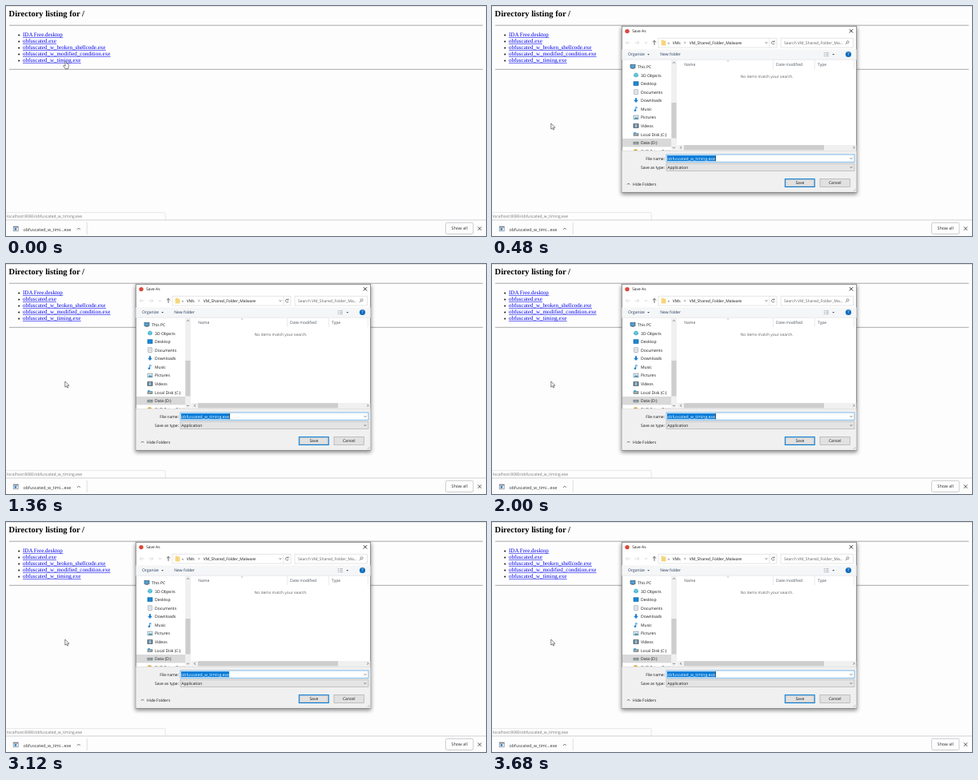
Recreate the animation shown at these times as an HTML page. Size 600 by 288 pixels, loop 8 s.

```html
<!DOCTYPE html>
<html lang="en">
<head>
<meta charset="utf-8">
<title>Save As</title>
<style>
html, body { margin: 0; width: 100%; height: 100%; overflow: hidden; background: #fdfdfe; }
svg { display: block; width: 600px; height: 288px; }
text { font-family: "Open Sans", "Noto Sans", sans-serif; text-rendering: geometricPrecision; white-space: pre; }
.page text { font: 7.03px "Liberation Serif", serif; fill: #0000ee; }
.page .title { font: bold 10.5px "Liberation Serif", serif; fill: #000; }
</style>
</head>
<body>
<svg id="stage" viewBox="0 0 600 288">
  <defs>
    <filter id="shadow" x="-6%" y="-9%" width="112%" height="118%"><feGaussianBlur stdDeviation="2.8"/></filter>
    <clipPath id="treeClip"><rect x="163" y="67" width="61" height="114.3"/></clipPath>
  </defs>
</svg>
<script>
const stage = document.getElementById('stage');

const text = (x, y, s, { fill = '#151515', size = 5, anchor = 'start' } = {}) =>
  `<text x="${x}" y="${y}" fill="${fill}" font-size="${size}" text-anchor="${anchor}">${s}</text>`;
const rect = (x, y, w, h, fill, stroke = 'none', extra = '') =>
  `<rect x="${x}" y="${y}" width="${w}" height="${h}" fill="${fill}" stroke="${stroke}" stroke-width=".7" ${extra}/>`;
const line = (d, color = '#666', width = .7) => `<path d="${d}" fill="none" stroke="${color}" stroke-width="${width}"/>`;
const shape = (d, fill, extra = '') => `<path d="${d}" fill="${fill}" ${extra}/>`;
const dot = (x, y, r, fill) => `<circle cx="${x}" cy="${y}" r="${r}" fill="${fill}"/>`;
const chevron = (x, y, dy, size = 1.6, color = '#444') => line(`M${x - size} ${y - dy}L${x} ${y + dy}L${x + size} ${y - dy}`, color);
const cross = (x, y, r, color) => line(`M${x - r} ${y - r}L${x + r} ${y + r}M${x + r} ${y - r}L${x - r} ${y + r}`, color, .9);
const triangle = (x, y) => shape(`M${x - 1.4} ${y - .7}h2.8l-1.4 1.5z`, '#444');

function page() {
  const files = [
    ['IDA Free.desktop', 50.3], ['obfuscated.exe', 42], ['obfuscated_w_broken_shellcode.exe', 104],
    ['obfuscated_w_modified_condition.exe', 109.6], ['obfuscated_w_timing.exe', 72.7]
  ];
  const rows = files.map(([name, width], i) => {
    const y = 38 + i * 8;
    return dot(16.2, y - 1.6, 1, '#111') + `<text x="21" y="${y}">${name}</text>` + line(`M21 ${y + 1.4}h${width}`, '#0000ee', .6);
  }).join('');
  return `<g class="page">${rect(0, 0, 600, 288, '#fdfdfe')}${line('M0 .4H600', '#d4d4d6')}
    <text class="title" x="3.6" y="13">Directory listing for /</text>
    ${line('M4 24.2H596M4 79.3H596', '#a0a0a0', .9)}${rows}</g>`;
}

function browserBars() {
  return rect(-1, 258.6, 200.2, 10, '#fdfdfe', '#dedee0', 'rx="1"')
    + text(1, 265.2, 'localhost:8080/obfuscated_w_timing.exe', { fill: '#747474' })
    + rect(0, 268, 600, 20, '#fdfdfe') + line('M0 268H600', '#bdbdc0')
    + rect(9.2, 276, 6, 5.8, '#f4f6f8', '#7d8894') + rect(9.2, 276, 6, 1.5, '#7d8894') + rect(10.6, 278.2, 2.6, 2.4, '#2e77b5')
    + text(21.5, 281.6, 'obfuscated_w_timi...exe', { fill: '#333', size: 5.4 })
    + chevron(90.8, 279, -1, 2) + line('M101.2 271V286', '#d0d0d3')
    + rect(549.6, 271.3, 34.4, 14.2, '#fdfdfe', '#b8b8bc', 'rx="1.8"')
    + text(566.8, 280.3, 'Show all', { fill: '#222', size: 5.2, anchor: 'middle' }) + cross(592, 278.6, 2.2, '#444');
}

// Small tree icons, each drawn around (x, y).
const icons = {
  pc: (x, y) => rect(x - 3, y - 2.6, 6, 4, '#4aa3dc', '#456') + line(`M${x - 1.8} ${y + 2.5}h3.6`, '#567'),
  cube: (x, y) => shape(`M${x} ${y - 3}l2.8 1.4v3l-2.8 1.5l-2.8-1.5v-3z`, '#43b4d0') + line(`M${x - 2.8} ${y - 1.6}l2.8 1.3l2.8-1.3M${x} ${y}v2.8`, '#d9f3fa', .5),
  desktop: (x, y) => rect(x - 3, y - 2.4, 6, 4.6, '#1b87d2', '#1769a5'),
  page: (x, y) => rect(x - 2.2, y - 2.9, 4.4, 5.8, '#fff', '#8c9298') + line(`M${x - 1.2} ${y - 1}h2.6m-2.6 1.6h2.6`, '#7790a8', .5),
  down: (x, y) => shape(`M${x - 1} ${y - 3}h2v2.5h2l-3 3.3l-3-3.3h2z`, '#1b7fd0'),
  music: (x, y) => line(`M${x - .2} ${y + 2}v-4.5l2 1.2`, '#1b7fd0', .9) + dot(x - 1.1, y + 1.8, 1.3, '#1b7fd0'),
  picture: (x, y) => rect(x - 3, y - 2.4, 6, 4.8, '#dbeefa', '#8594a0') + shape(`M${x - 2.5} ${y + 2}l2-2.6l1.4 1.3l1-1l1 2.3z`, '#438b9c'),
  video: (x, y) => rect(x - 3, y - 2.4, 6, 4.8, '#8db5cf', '#4c5358') + line(`M${x - 2.4} ${y - 2.4}v4.8m4.8-4.8v4.8`, '#444', .8),
  disk: (x, y) => rect(x - 3, y - .9, 6, 2.6, '#a6adb2', '#687078') + dot(x + 1.8, y + .5, .5, '#37b24d'),
  system: (x, y) => icons.disk(x, y) + rect(x - 2.5, y - 2.7, 2.2, 2, '#25a0da'),
  disc: (x, y) => dot(x - .5, y, 2.6, '#d7a437') + rect(x - .5, y - .5, 3.5, 2.5, '#555')
};

function tree() {
  const items = [
    ['pc', 'This PC'], ['cube', '3D Objects'], ['desktop', 'Desktop'], ['page', 'Documents'], ['down', 'Downloads'],
    ['music', 'Music'], ['picture', 'Pictures'], ['video', 'Videos'], ['system', 'Local Disk (C:)'],
    ['disk', 'Data (D:)'], ['disc', 'DVD Drive (E:) V']
  ];
  const rows = items.map(([icon, label], i) => {
    const y = 76 + i * 10.58, indent = i ? 4 : 0;
    const back = label === 'Data (D:)' ? rect(163, y - 5.2, 62, 10.4, '#d9d9d9') : '';
    return back + icons[icon](176 + indent, y) + text(182 + indent, y + 2, label, { size: 5.05 });
  }).join('');
  return `<g clip-path="url(#treeClip)">${rows}</g>`
    + rect(224, 67.4, 7, 114, '#f0f0f0') + rect(224.4, 121, 6, 44.5, '#cdcdcd')
    + chevron(227.4, 71, -.7, 1.4) + chevron(227.4, 177.4, .7, 1.4);
}

function fileList() {
  const heading = { fill: '#4c5560' };
  return text(240.3, 74.6, 'Name', heading) + chevron(295, 69, -.5, 1.1, '#999')
    + text(355, 74.6, 'Date modified', heading) + text(407, 74.6, 'Type', heading)
    + line('M351.5 68V79M403.5 68V79M452.5 68V79', '#e3e3e3')
    + text(343.6, 90.3, 'No items match your search.', { fill: '#606060', size: 4.95, anchor: 'middle' })
    + rect(231.5, 174, 223.8, 7, '#f0f0f0') + rect(240, 174.2, 175, 6.2, '#cdcdcd')
    + line('M236.8 175.8l-1.4 1.5l1.4 1.5M451.6 175.8l1.4 1.5l-1.4 1.5', '#444');
}

function navigation() {
  return line('M172.8 46H167.4M169.6 43.8L167.4 46L169.6 48.2M178.4 46H183.8M181.6 43.8L183.8 46L181.6 48.2', '#cfcfcf')
    + chevron(192.5, 46, .5, 1.1, '#aaa') + line('M203 48.8V43.3M200.9 45.4L203 43.3L205.1 45.4', '#444', .8)
    + rect(208, 40.2, 148, 11.8, '#fff', '#d9d9d9') + line('M346.8 40.5V51.8', '#e0e0e0')
    + shape('M211.6 42.6h2.6l.7.9h2.5v5.9h-5.8z', '#f6d57c')
    + text(219.5, 47.8, '«', { fill: '#444' }) + text(225.8, 47.8, 'VMs')
    + line('M240.4 44.7l1.3 1.3l-1.3 1.3', '#555') + text(246.8, 47.8, 'VM_Shared_Folder_Malware')
    + chevron(343, 46, .7, 1.4)
    + line('M352.6 44.6A1.9 1.9 0 1 0 353.1 46.8M353 43.4V45H351.4', '#555')
    + rect(361, 40.2, 90.4, 11.8, '#fff', '#d9d9d9')
    + text(365, 47.8, 'Search VM_Shared_Folder_Ma...', { fill: '#636363' })
    + `<circle cx="444.6" cy="45.2" r="1.5" fill="none" stroke="#555" stroke-width=".6"/>` + line('M443.5 46.3l-1.7 1.8', '#555');
}

function toolbar() {
  const label = { fill: '#1e395b' };
  return rect(162.4, 54.4, 293.2, 12.8, '#f5f6f7') + line('M162.5 67.2H455.5', '#e2e3e5')
    + text(170, 62.4, 'Organize', label) + triangle(195.6, 60.6) + text(210.3, 62.4, 'New folder', label)
    + line('M414.8 58.6h1.6m1 0h3.4M414.8 60.6h1.6m1 0h3.4M414.8 62.6h1.6m1 0h3.4', '#9aa2aa', .8) + triangle(426.8, 60.6)
    + dot(445.5, 60.5, 3.6, '#0f6cbd') + text(445.5, 62.4, '?', { fill: '#fff', size: 5.4, anchor: 'middle' });
}

function saveForm() {
  return rect(162.4, 181.4, 293.2, 51.4, '#f0f0f0') + line('M162.5 181.5H455.5', '#dcdcdc')
    + text(216, 192.8, 'File name:', { anchor: 'end' })
    + rect(218, 186, 235, 9.5, '#fff', '#4a9fe0') + rect(219, 187.2, 60, 7, '#0078d7')
    + text(219.2, 192.6, 'obfuscated_w_timing.exe', { fill: '#fff', size: 5.1 })
    + rect(279, 187, .7, 7.4, '#111', 'none', 'id="caret"') + chevron(449, 190.9, .7, 1.4)
    + text(216, 203.8, 'Save as type:', { anchor: 'end' })
    + rect(218, 197.6, 235, 9, '#e4e4e4', '#b4b4b4') + text(219.3, 203.8, 'Application') + chevron(449, 202, .7, 1.4)
    + chevron(170.6, 222.8, -.8, 1.6, '#222') + text(176, 224.6, 'Hide Folders')
    + rect(366.3, 216.6, 37, 9.9, '#e1e1e1', '#0078d7', 'style="stroke-width:1"')
    + rect(367.4, 217.7, 34.8, 7.7, 'none', '#666', 'stroke-dasharray=".5 .5" style="stroke-width:.4"')
    + text(384.8, 223.4, 'Save', { anchor: 'middle' })
    + rect(410, 216.5, 37.4, 10, '#e1e1e1', '#adadad') + text(428.7, 223.4, 'Cancel', { anchor: 'middle' })
    + line('M451.6 231.8L454.4 229M453.2 231.8L454.4 230.6', '#b0b0b0');
}

function dialog() {
  return `<g id="dialog">${rect(161.5, 27, 295, 209, '#000', 'none', 'opacity=".45" filter="url(#shadow)"')}
    ${rect(162.3, 25.3, 293.4, 207.8, '#fff', '#6f6f72')}
    ${dot(169, 31.6, 2.7, '#d9483b')}${text(175.2, 33.4, 'Save As', { size: 4.9 })}${cross(449, 31.3, 2.2, '#222')}
    ${navigation()}${toolbar()}${tree()}${fileList()}${saveForm()}</g>`;
}

const outline = 'stroke="#222" stroke-width=".55" stroke-linejoin="round"';
const cursors = `<g id="arrow">${shape('M0 0V7.2L1.7 5.7L2.8 8.1L4 7.6L2.9 5.2H5.1Z', '#fff', outline)}</g>
  <g id="hand">${shape('M74 74V69.6Q74.8 68.4 75.6 69.6V72L77.8 72.6Q78.6 73 78.5 74.4L77.6 78.6H74L71.9 75.2Q71.7 74 72.8 74.2L74 75.4Z', '#fff', outline)}</g>`;

stage.insertAdjacentHTML('beforeend', page() + browserBars() + dialog() + cursors);

const part = id => document.getElementById(id);
const show = (id, on) => part(id).setAttribute('visibility', on ? 'visible' : 'hidden');

const LOOP = 8000, CLICK = 80, OPEN = 480, BLINK_START = 1040, BLINK_END = 3600, BLINK = 300;

function update(t) {
  const open = t >= OPEN;
  const blinking = t >= BLINK_START && t < BLINK_END;
  show('hand', t < CLICK);
  show('arrow', t >= CLICK);
  part('arrow').setAttribute('transform', open ? 'translate(73.8 147)' : 'translate(74.2 69)');
  show('dialog', open);
  show('caret', open && !(blinking && Math.floor((t - BLINK_START) / BLINK) % 2 === 0));
}

const start = performance.now();
function tick() {
  update((performance.now() - start) % LOOP);
  requestAnimationFrame(tick);
}
tick();
</script>
</body>
</html>
```
